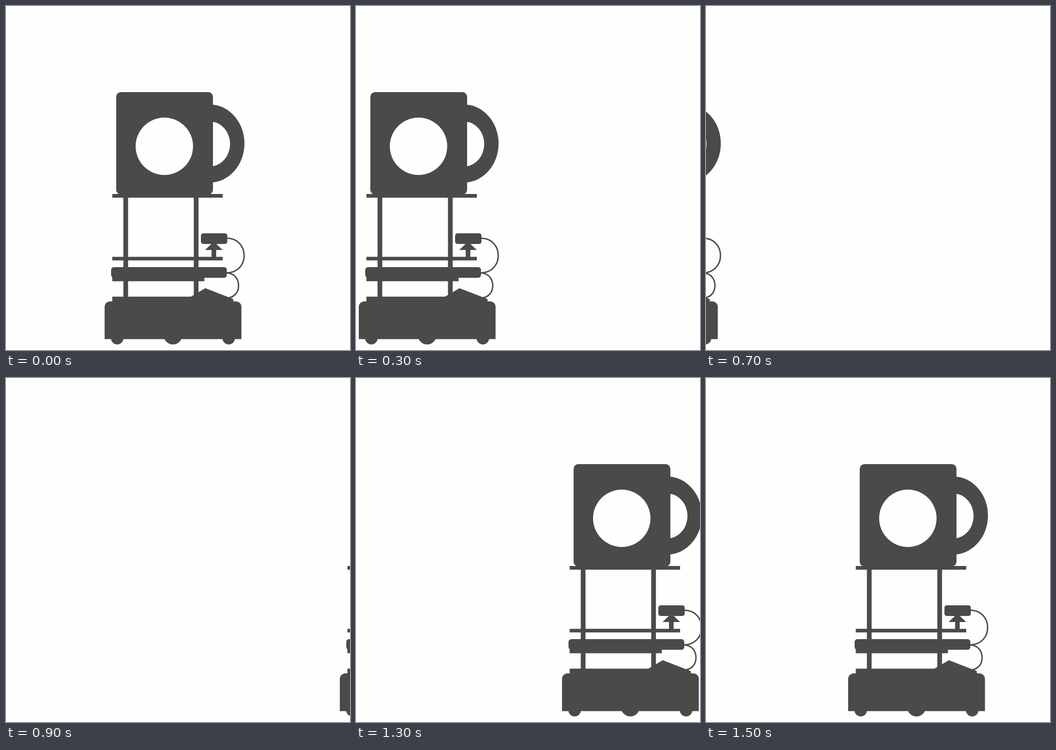
An HTML page that plays this animation: 743x743 px, repeating every 1600 ms.

```html
<!DOCTYPE html>
<html lang="en">
<head>
<meta charset="utf-8">
<title>Rolling robot</title>
<style>
  html, body { margin: 0; width: 100%; height: 100%; overflow: hidden; background: #fefefe; }
  svg { display: block; width: 100vw; height: 100vh; }
</style>
</head>
<body>
<svg viewBox="0 0 743 743">
  <g id="robot" fill="#4a4a4a">
    <!-- mug -->
    <ellipse cx="440" cy="297" rx="75" ry="84.3"/>
    <ellipse cx="440" cy="298" rx="44" ry="48.6" fill="#fefefe"/>
    <rect x="238" y="186" width="209" height="221" rx="10"/>
    <circle cx="342" cy="303" r="62" fill="#fefefe"/>
    <!-- shelves and posts -->
    <path d="M229.5 406H468v8H229.5z M229.5 541.7H468v7.8H229.5z M229.5 586H428.5v8.6H229.5z
             M253.5 412h10.2v218h-10.2z M405.6 412h10.2v218h-10.2z"/>
    <rect x="227" y="564" width="250" height="23" rx="6"/>
    <!-- sensor and cables -->
    <rect x="421" y="491" width="57" height="23" rx="5"/>
    <path d="M430 527L449 509 468 527H454v16H444V527z"/>
    <path d="M477 501.5C500 501.5 514.3 519 514.3 539S500 576.5 476 576.5C493 577 502.3 589 502.3 604S493 629 478 631"
          fill="none" stroke="#4a4a4a" stroke-width="3"/>
    <!-- base and wheels -->
    <path d="M229.5 640V627.7H399.5L430.5 609.5 491 633V640z
             M213 719.5V650a12 12 0 0 1 12-12H496.5a12 12 0 0 1 12 12V719.5z"/>
    <circle cx="240.2" cy="717.5" r="13.5"/>
    <circle cx="360.6" cy="710.8" r="20.2"/>
    <circle cx="481" cy="717.5" r="13.5"/>
  </g>
</svg>
<script>
  const LOOP = 1600, STEP = 100, SHIFT = 69, WRAP = 1129;
  const robot = document.getElementById('robot');

  function draw(now) {
    const step = Math.floor((now % LOOP) / STEP);
    const x = (step < 8 ? 0 : WRAP) - SHIFT * step;
    robot.setAttribute('transform', `translate(${x})`);
    requestAnimationFrame(draw);
  }
  draw(performance.now());
</script>
</body>
</html>
```
